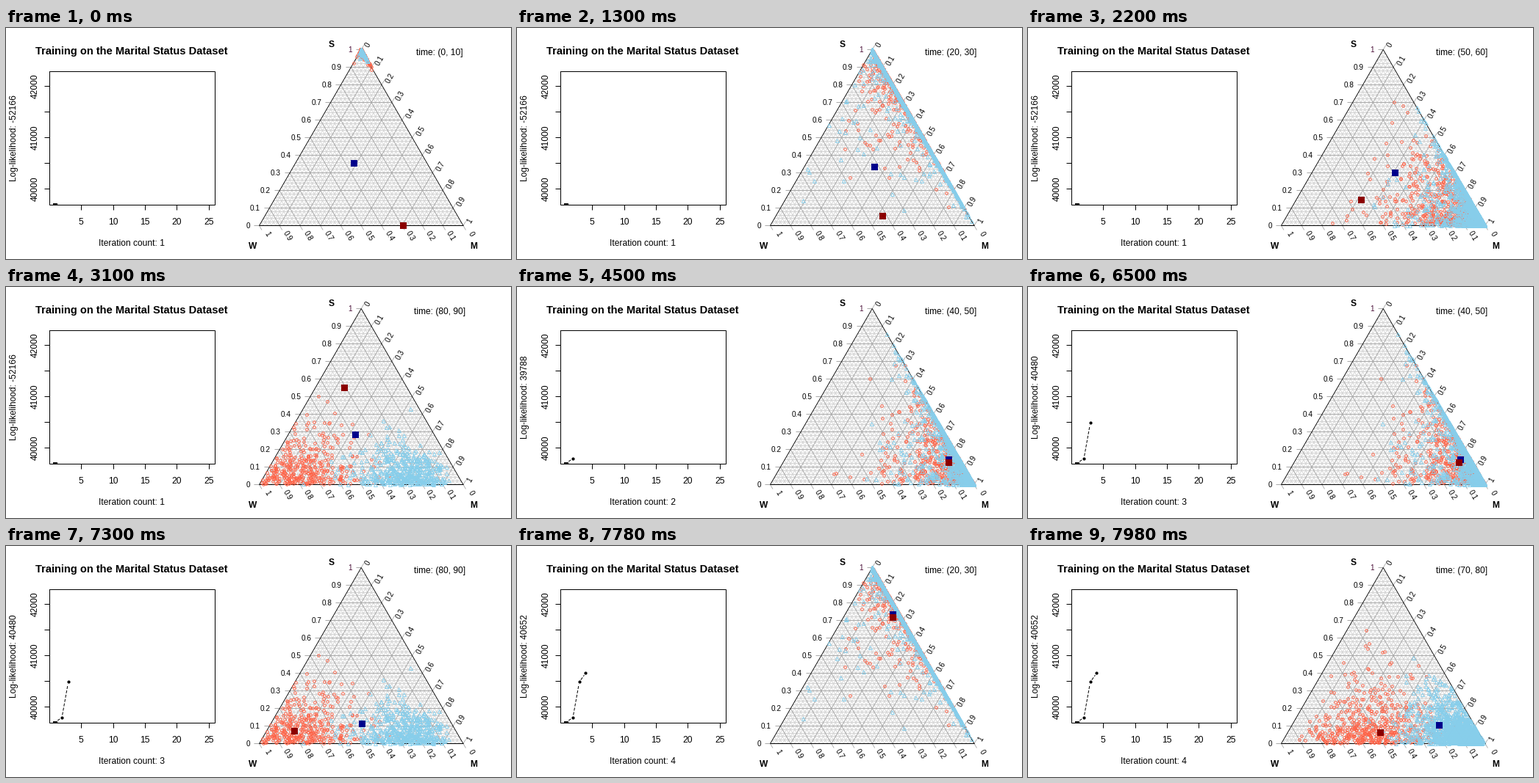
Write a matplotlib script that moves like this. It is 687x315 px and loops after 8 s.

```python
import math

import matplotlib.pyplot as plt
import numpy as np
from matplotlib.animation import FuncAnimation

W, H = 687, 315
TICK_MS, LOOP_MS = 20, 8000

plt.rcParams["font.family"] = "Liberation Sans"
# 72 dpi makes one point equal one pixel
fig = plt.figure(figsize=(W / 72, H / 72), dpi=72, facecolor="white")


def pixel_axes():
    ax = fig.add_axes([0, 0, 1, 1])
    ax.set(xlim=(0, W), ylim=(H, 0))
    ax.axis("off")
    return ax


def label(ax, x, y, s, size=12, rot=0, ha="center", **kw):
    """Text whose capitals are centred on y, also when rotated."""
    a = math.radians(rot)
    drop = 0.36 * size
    return ax.text(x + drop * math.sin(a), y + drop * math.cos(a), s,
                   size=size, rotation=rot, rotation_mode="anchor",
                   ha=ha, va="baseline", **kw)


def segments(ax, segs, color):
    """Upright and level lines snap to pixels, slanted ones are smooth."""
    for (x0, y0), (x1, y1) in segs:
        slanted = abs(x0 - x1) > 0.01 and abs(y0 - y1) > 0.01
        d = 0.5 if slanted else 0
        ax.plot([x0 + d, x1 + d], [y0 + d, y1 + d], color=color,
                lw=0.87 if slanted else 1, snap=not slanted,
                solid_capstyle="butt")


# ---- coordinates ----

def tern(s, m):
    """Shares of S and M to pixels."""
    return 344 + 277.5 * (m + s / 2), 269 - 240 * s


def chart(i, value):
    return 58.7 + 8.68 * i, 219 - 0.07 * (value - 40000)


# ---- static layer ----

def draw_chart_frame(ax):
    label(ax, 171, 31, "Training on the Marital Status Dataset", 14.6,
          weight="bold")
    ax.plot([59, 284, 284, 59, 59], [59, 59, 241, 241, 59], color="black",
            lw=1, solid_joinstyle="miter")
    ticks = []
    for i in range(5, 26, 5):
        x = round(chart(i, 0)[0])
        ticks.append(((x, 241), (x, 248)))
        label(ax, x, 264, str(i))
    for v in range(40000, 42001, 500):
        y = round(chart(0, v)[1])
        ticks.append(((52, y), (59, y)))
        if v % 1000 == 0:
            label(ax, 38, y, str(v), rot=90)
    segments(ax, ticks, "black")


def grid_lines(n):
    out = []
    for f in np.arange(1, n) / n:
        out += [(tern(f, 0), tern(f, 1 - f)),
                (tern(0, f), tern(1 - f, f)),
                (tern(0, f), tern(f, 0))]
    return out


def draw_ternary(ax):
    segments(ax, grid_lines(50), "lightgrey")
    segments(ax, grid_lines(10), "darkgrey")
    ticks = []
    for f in np.arange(11) / 10:
        text = f"{f:g}"
        near = 2.5 * (len(text) == 1)
        x, y = tern(f, 0)
        ticks.append(((x, y), (x - 7, y)))
        label(ax, x - 12, y + 0.5, text, 10, ha="right",
              color="#4a1038" if f == 1 else "black")
        x, y = tern(1 - f, f)
        ticks.append(((x, y), (x + 3.5, y - 6)))
        label(ax, x + 11.5 - near, y - 9 + near, text, 10, 60)
        x, y = tern(0, 1 - f)
        ticks.append(((x, y), (x + 3.5, y + 6)))
        label(ax, x + 11.5, y + 14 - near, text, 10, -60)
    segments(ax, ticks, "darkgrey")
    corners = [tern(1, 0), tern(0, 1), tern(0, 0), tern(1, 0)]
    segments(ax, zip(corners, corners[1:]), "black")
    for x, y, s in ((443, 22, "S"), (336, 297, "W"), (636, 297, "M")):
        label(ax, x, y, s, weight="bold")


def static_layer():
    ax = pixel_axes()
    draw_chart_frame(ax)
    draw_ternary(ax)
    fig.canvas.draw()
    image = np.array(fig.canvas.buffer_rgba())
    fig.clear()
    return image


# ---- point clouds: everyone starts at S, drifts to M, then to W ----

rng = np.random.default_rng(11)


def sigmoid(x):
    return 1 / (1 + math.exp(-x))


def cloud(n, focus, s_end, w):
    """n points around the shares S and W of the group."""
    s = s_end + (1 - s_end) * sigmoid(1.8 * (2.4 - t))
    mean = np.array([s, (1 - s) * (1 - w), (1 - s) * w])
    s, m, _ = rng.dirichlet(focus * mean, int(n)).T
    return tern(s, m)


reds, blues = [], []
for t in range(10):
    reds.append(cloud(600 * sigmoid(1.3 * (8.4 - t)),
                      40 * math.exp(-3 * t) + 3 + 0.8 * t,
                      0.11, 0.08 + 0.9 * sigmoid(1.2 * (t - 6.9))))
    blues.append(cloud(1500 * sigmoid(1.8 * (7.6 - t)),
                       100 * math.exp(-4 * t) + 2 + 0.2 * t * t,
                       0.085, 0.025 + 0.5 * sigmoid(1.3 * (t - 8))))


# ---- model estimates (squares) ----

def along(t, keys, xs, ys):
    return np.array([np.interp(t, keys, xs), np.interp(t, keys, ys)])


def estimates(it, t):
    """Red and blue centre: a random start, then a shared path that splits."""
    if it == 0:
        keys = (0, 3, 5, 8)
        return (along(t, keys, (540, 475, 453, 460), (269, 249, 234, 137)),
                along(t, keys, (473, 493, 499, 475), (184, 192, 197, 201)))
    mid = along(t, (0, 2, 4, 5.5, 7, 8, 9),
                (482, 511, 587, 582, 519, 438, 405),
                (33, 95, 237, 253, 249, 247, 238))
    split = (32 * it - 18) * (t / 8) ** 5
    half = np.array([-split, 2 + 0.07 * split])
    return mid + half, mid - half


LOGLIK = [-52166, 39788, 40480, 40652]
history = [(67.4, 240)] + [chart(i + 1, LOGLIK[i]) for i in range(1, 4)]


def links(points, gap=3.5):
    """Lines between neighbours that stop short of the dots."""
    xs, ys = [], []
    for a, b in zip(points, points[1:]):
        a, b = np.array(a), np.array(b)
        d = (b - a) / np.hypot(*(b - a)) * gap
        xs += [a[0] + d[0], b[0] - d[0], np.nan]
        ys += [a[1] + d[1], b[1] - d[1], np.nan]
    return xs, ys


# ---- moving layer ----

back = static_layer()
fig.figimage(back, zorder=-1)
ax = pixel_axes()


def markers(shape, size, color, filled=True):
    return ax.plot([], [], shape, ms=size, mec=color,
                   mew=0 if filled else 0.9,
                   mfc=color if filled else "none")[0]


red_dots = markers("o", 3.6, "tomato", False)
blue_dots = markers("^", 5, "skyblue", False)
blue_mean = markers("s", 9, "#00008b")
red_mean = markers("s", 9, "#8b0000")
ax.fill([64, 70, 70, 64], [239, 239, 241, 241], "black", lw=0)
trace = ax.plot([], [], color="black", lw=1, dashes=(4, 2))[0]
trace_dots = markers("o", 4.2, "black")
period_text = label(ax, 590, 33, "")
count_text = label(ax, 171, 293, "")
loglik_text = label(ax, 10, 150.5, "", rot=90)

durations = [1000] + [300] * 9 + [200] * 20 + [40] * 8
starts = np.cumsum([0] + durations[:-1])


def update(frame):
    step = int(np.searchsorted(starts, frame * TICK_MS, side="right")) - 1
    it, t = divmod(step, 10)
    red_dots.set_data(*reds[t])
    blue_dots.set_data(*blues[t])
    for mark, (x, y) in zip((red_mean, blue_mean), estimates(it, t)):
        mark.set_data([round(x)], [round(y)])
    shown = history[:it + 1]
    trace.set_data(*links(shown))
    trace_dots.set_data([p[0] for p in shown[1:]], [p[1] for p in shown[1:]])
    period_text.set_text(f"time: ({t * 10}, {t * 10 + 10}]")
    count_text.set_text(f"Iteration count: {it + 1}")
    loglik_text.set_text(f"Log-likelihood: {LOGLIK[it]}")
    return (red_dots, blue_dots, red_mean, blue_mean, trace, trace_dots,
            period_text, count_text, loglik_text)


anim = FuncAnimation(fig, update, frames=LOOP_MS // TICK_MS,
                     interval=TICK_MS, repeat=True, repeat_delay=0)
plt.show()
```
